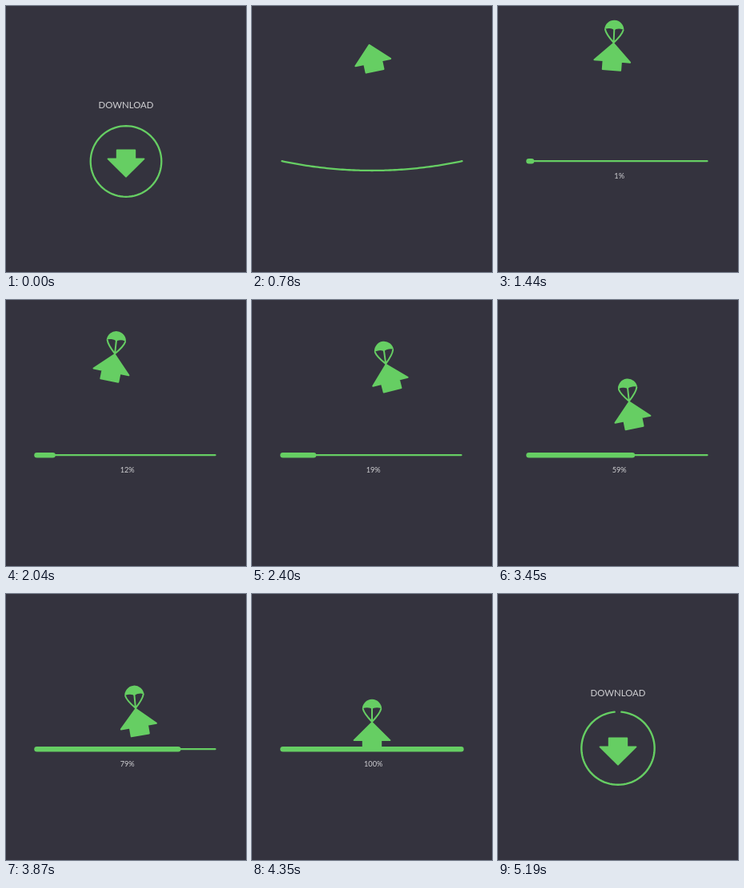
Write an HTML page that moves like this. It is 300 by 333 pixels and loops after 5220 ms.

```html
<!DOCTYPE html>
<html lang="en">
<head>
<meta charset="utf-8">
<title>Download</title>
<style>
  html, body { margin: 0; width: 100%; height: 100%; overflow: hidden; background: #34333e; }
  svg { display: block; width: 100%; height: 100%; }
  text { font-family: Lato, sans-serif; fill: #d0d0d3; text-anchor: middle; }
  .line { fill: none; stroke: #66ce63; stroke-linecap: round; stroke-linejoin: round; }
  .solid { fill: #66ce63; stroke: #66ce63; stroke-width: 2; stroke-linejoin: round; }
</style>
</head>
<body>
<svg viewBox="0 0 300 333">
  <clipPath id="above"><rect width="300" height="194"/></clipPath>
  <text id="label" x="150" y="127.8" font-size="11.4">DOWNLOAD</text>
  <path id="rope" class="line"/>
  <path id="bar" class="line" stroke-width="6.4"/>
  <g id="stage">
    <g id="chute">
      <path fill="#66ce63" d="M-12.2-15.2A12.2 12.6 0 0 1 12.2-15.2Q11-17.2 6.2-17.2Q1.5-17.2 0-14.8Q-1.5-17.2-6.2-17.2Q-11-17.2-12.2-15.2Z"/>
      <path class="line" stroke-width="2" d="M-11.2-15.5Q-10-10 0 .5Q10-10 11.2-15.5M0-16V0"/>
    </g>
    <path id="arrow" class="solid" d="M0 1.4L22.4 23.6H11.2V34.5H-11.2V23.6H-22.4Z"/>
  </g>
  <path id="tick" class="line" stroke-width="7" pathLength="1" d="M124.5 125L142 143L176.5 105.5"/>
  <text id="percent" x="151.7" y="216" font-size="9.2"></text>
</svg>
<script>
const LOOP = 5220, MID = 150, LEFT = 38.5, WIDTH = 223, LINE_Y = 194.2;
const el = Object.fromEntries(
  ['label', 'rope', 'bar', 'stage', 'chute', 'arrow', 'tick', 'percent']
    .map(id => [id, document.getElementById(id)]));

const part = (t, a, b) => Math.min(1, Math.max(0, (t - a) / (b - a)));
const mix = (a, b, k) => a + (b - a) * k;
const out = (k, n) => 1 - (1 - k) ** n;
const linear = k => k;
const sine = k => (1 - Math.cos(Math.PI * k)) / 2;

function track(steps, t, ease = linear) {
  if (t <= steps[0][0]) return steps[0][1];
  for (let i = 1; i < steps.length; i++) {
    const [a, from] = steps[i - 1], [b, to] = steps[i];
    if (t < b) return mix(from, to, ease((t - a) / (b - a)));
  }
  return steps[steps.length - 1][1];
}

const tipY = [[960, 33], [1200, 38], [1530, 48.5], [2050, 68.5], [2790, 96],
  [3450, 127.5], [3690, 135], [4220, 159.5]];
const swing = [[1100, 0], [1960, 13], [2510, -17], [3055, 15.5], [3600, -17], [4200, 0]];
// square roots of the shares
const barRoot = [[1030, 0], [1530, .153], [2040, .3], [2790, .541], [3450, .7616], [4230, 1]];
const textRoot = [[1030, 0], [2040, .347], [2790, .5395], [3450, .7685], [4230, 1]];

const show = (node, alpha) => node.setAttribute('opacity', alpha);

// A rope of fixed centre, bent from a flat line (0) to a closed ring (1).
function drawRope(bend, size, width) {
  const half = Math.max(.0005, Math.PI * bend);
  const r = (WIDTH + 55.4 * (bend > .5 ? Math.max(bend, size) : bend)) / (2 * half);
  const bottom = mix(LINE_Y, 238.8, size);
  let d = '';
  for (let i = 0; i <= 80; i++) {
    const a = half * (i / 40 - 1);
    d += (i ? 'L' : 'M') + (MID + r * Math.sin(a)).toFixed(2) + ' ' +
      (bottom - r * (1 - Math.cos(a))).toFixed(2);
  }
  el.rope.setAttribute('d', d);
  el.rope.setAttribute('stroke-width', width);
}

function place(x, y, turn) {
  el.arrow.setAttribute('transform', `translate(${x} ${y}) rotate(${turn})`);
}

function placeCentre(y, turn) {
  const a = turn * Math.PI / 180;
  place(MID + 17.7 * Math.sin(a), y - 17.7 * Math.cos(a), turn);
}

function drawArrow(t) {
  show(el.stage, t < 4480 ? 1 : part(t, 5000, 5150));
  show(el.chute, t > 1020 && t < 4480 ? 1 : 0);
  if (t < 960 || t >= 4950) {
    const k = t < 960 ? part(t, 520, 960) : 0;
    el.stage.removeAttribute('clip-path');
    placeCentre(mix(197.3, 50.7, out(k, 2.6)), -180 * (1 - out(k, 3)));
    return;
  }
  const turn = track(swing, t, sine), a = turn * Math.PI / 180;
  const sink = 66 * part(t, 4360, 4480) ** 2;
  const x = MID - 70 * Math.sin(a);
  const y = track(tipY, t) - 70 * (1 - Math.cos(a)) + sink;
  if (t > 4200) el.stage.setAttribute('clip-path', 'url(#above)');
  else el.stage.removeAttribute('clip-path');
  place(x, y, turn);
  const open = out(part(t, 1020, 1230), 2);
  el.chute.setAttribute('transform',
    `translate(${x} ${y}) rotate(${turn * .55}) scale(${open})`);
}

function draw(t) {
  const back = t >= 4950;

  if (back) {
    const k = part(t, 4950, 5220);
    drawRope(out(k, 1.57), out(part(t, 4950, 5170), 1.6), mix(6.4, 2.4, part(t, 4950, 5100)));
  } else {
    const k = part(t, 480, 960);
    drawRope((1 - k) ** 2.75, (1 - k) ** 1.35, 2.3);
  }

  const share = track(barRoot, t) ** 2;
  show(el.bar, share > 0 && !back ? 1 : 0);
  el.bar.setAttribute('d', `M${LEFT} ${LINE_Y}h${WIDTH * share}`);

  el.percent.textContent = Math.floor(100 * track(textRoot, t) ** 2) + '%';
  const rise = part(t, 1020, 1250);
  el.percent.setAttribute('y', 216 + 3 * (1 - out(rise, 2)));
  show(el.percent, back ? 1 - part(t, 4950, 5040) : rise);

  show(el.label, back ? part(t, 5000, 5150) : 1 - part(t, 480, 620));

  const stroke = out(part(t, 4430, 4590), 2);
  el.tick.setAttribute('stroke-dasharray', `${stroke} 2`);
  show(el.tick, stroke > 0 ? 1 - part(t, 4950, 5040) : 0);

  drawArrow(t);
}

const start = performance.now();
function loop(now) {
  draw(Math.max(0, now - start) % LOOP);
  requestAnimationFrame(loop);
}
draw(0);
requestAnimationFrame(loop);
</script>
</body>
</html>
```
